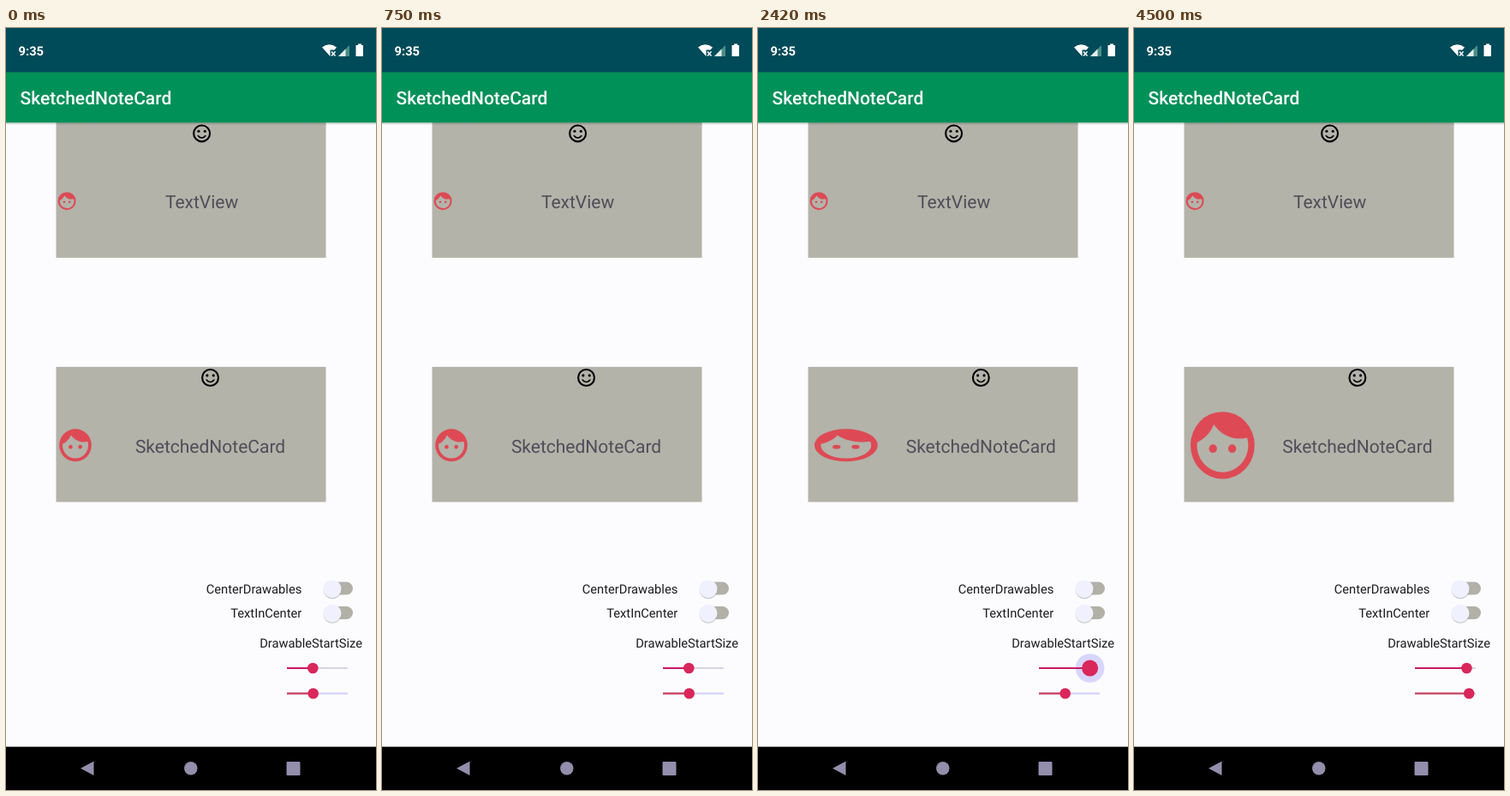
An HTML page for the animation above (4580 ms loop, 432x888 px).

```html
<!DOCTYPE html>
<html lang="en">
<head>
<meta charset="utf-8">
<title>Icon size sliders</title>
<style>
html, body { margin: 0; width: 100%; height: 100%; overflow: hidden; background: #fcfcff; }
svg { display: block; width: 432px; height: 888px; font-family: Roboto, sans-serif; text-rendering: geometricPrecision; }
.big { font-size: 21px; fill: #504d59; text-anchor: middle; }
.label { font-size: 14.7px; fill: #1b1b1d; text-anchor: end; }
.bar { font-weight: 500; fill: #fff; }
</style>
</head>
<body>
<svg viewBox="0 0 432 888">
  <defs>
    <linearGradient id="shade" x2="0" y2="1">
      <stop stop-color="#000" stop-opacity=".2"/>
      <stop offset="1" stop-color="#000" stop-opacity="0"/>
    </linearGradient>
    <path id="face" fill="#dd4a55" fill-rule="evenodd" d="M9 11.75a1.25 1.25 0 1 0 0 2.5a1.25 1.25 0 1 0 0-2.5z M15 11.75a1.25 1.25 0 1 0 0 2.5a1.25 1.25 0 1 0 0-2.5z M12 2a10 10 0 1 0 0 20a10 10 0 1 0 0-20z M12 20a8 8 0 0 1-7.95-8.86c2.36-1.05 4.23-2.98 5.21-5.37C11.07 8.33 14.05 10 17.42 10c.78 0 1.53-.09 2.25-.26A8 8 0 0 1 12 20z"/>
    <g id="smile" transform="scale(1.05) translate(-12 -12)">
      <circle cx="12" cy="12" r="9" fill="none" stroke="#000" stroke-width="2"/>
      <circle cx="8.5" cy="9.5" r="1.5"/>
      <circle cx="15.5" cy="9.5" r="1.5"/>
      <path d="M12 16c-1.48 0-2.75-.81-3.45-2H6.88c.8 2.05 2.79 3.5 5.12 3.5s4.32-1.45 5.12-3.5h-1.67c-.7 1.19-1.97 2-3.45 2z"/>
    </g>
    <g id="switch">
      <rect x="371" y="-7.5" width="34" height="15" rx="7.5" fill="#b1b1a8"/>
      <circle cx="381" cy="1.8" r="10.5" fill="#000" opacity=".2"/>
      <circle cx="381" cy=".7" r="10.5" fill="#f1f0fe"/>
    </g>
  </defs>

  <rect width="432" height="888" fill="#fcfcff"/>
  <g fill="#b3b3a9">
    <rect x="58.5" y="110" width="315" height="157.8"/>
    <rect x="58.5" y="394.9" width="315" height="157.5"/>
  </g>

  <rect y="110.3" width="432" height="3" fill="url(#shade)"/>
  <rect y="51" width="432" height="59.3" fill="#009158"/>
  <rect width="432" height="51.5" fill="#004b59"/>
  <text class="bar" x="14.6" y="32" font-size="14.7" style="font-weight:700">9:35</text>
  <text class="bar" x="16.5" y="89" font-size="21">SketchedNoteCard</text>

  <path d="M369 22.5Q377.5 16 386 22.5L383.5 25.5H378.5V33z" fill="#fff"/>
  <path d="M380 27.5l4.5 5m0-5l-4.5 5" stroke="#fff" stroke-width="1.5"/>
  <path d="M388 33L401 20V33z" fill="#4a8d87"/>
  <path d="M388 33L396.5 24.5V33z" fill="#e4f3ee"/>
  <path d="M411 18.5h4v1.5h2v13h-8.5v-13h2.5z" fill="#fff"/>

  <use href="#smile" transform="translate(228.6 122.9)"/>
  <use href="#face" transform="translate(58.5 189.1) scale(1.05)"/>
  <text class="big" x="228.6" y="210">TextView</text>

  <use id="sized" href="#face"/>
  <g id="shifted">
    <use href="#smile" transform="translate(0 407.5)"/>
    <text class="big" y="495">SketchedNoteCard</text>
  </g>

  <text class="label" x="345.3" y="658.5">CenterDrawables</text>
  <text class="label" x="345.3" y="687">TextInCenter</text>
  <text class="label" x="416" y="722">DrawableStartSize</text>
  <use href="#switch" y="653"/>
  <use href="#switch" y="681.5"/>
  <g id="sliders"></g>

  <rect y="837.6" width="432" height="51"/>
  <g fill="#938eab">
    <path d="M87 862.8L102.5 854.6V871z"/>
    <circle cx="215.8" cy="862.8" r="7.7"/>
    <rect x="327.5" y="855" width="16" height="16" rx="1"/>
  </g>
</svg>
<script>
const LOOP = 4580, TRACK = 328, SCALE = 1.487;
const $ = id => document.getElementById(id);

// Repaint runs: first time, last time, number of repaints
const RUNS = [[2170, 2420, 6], [2630, 2880, 5], [3130, 3250, 2],
              [3420, 3420, 1], [3590, 3670, 3], [3920, 4380, 8]];

// Keys are [time, value]
const sliders = [
  { y: 746, fill: '#c91a68', rest: '#d7d5e4',
    pos: [[2120, 358.3], [2420, 387.6], [2580, 387.6], [2680, 388.4]],
    press: [[2120, 0], [2320, 1], [2580, 1], [2880, 0]] },
  { y: 775.5, fill: '#c93852', rest: '#d0cffb',
    pos: [[3130, 358.7], [3250, 360.1], [3420, 382], [3590, 389], [3670, 391.2]],
    press: [[3050, 0], [3250, .5], [3420, 1], [3880, 1], [4250, 0]] }
];

for (const s of sliders) {
  $('sliders').insertAdjacentHTML('beforeend', `<g>
    <circle cy="${s.y}" fill="#d8d6fb"/>
    <path d="M${TRACK} ${s.y}H399" stroke="${s.rest}" stroke-width="2.1"/>
    <path stroke="${s.fill}" stroke-width="2.1"/>
    <circle cy="${s.y}" fill="#d9265b"/></g>`);
  [s.ripple, , s.bar, s.thumb] = $('sliders').lastElementChild.children;
}

// Time of the latest repaint
function snap(t) {
  let last = 0;
  for (const [from, to, n] of RUNS) {
    if (t < from) break;
    const step = n > 1 ? (to - from) / (n - 1) : 1;
    last = Math.min(to, from + Math.floor((t - from) / step + 1e-6) * step);
  }
  return last;
}

function at(keys, t) {
  const i = keys.findIndex(k => k[0] > t);
  if (i < 0) return keys[keys.length - 1][1];
  if (i === 0) return keys[0][1];
  const [t0, a] = keys[i - 1], [t1, b] = keys[i];
  return a + (b - a) * (t - t0) / (t1 - t0);
}

function draw(now) {
  const t = snap(now % LOOP);
  const [w, h] = sliders.map(s => {
    const x = at(s.pos, t), p = at(s.press, t), glow = Math.min(1, 2 * p);
    s.bar.setAttribute('d', `M${TRACK} ${s.y}H${x}`);
    s.thumb.setAttribute('cx', x);
    s.thumb.setAttribute('r', 6.3 + 3.2 * p);
    s.ripple.setAttribute('cx', x);
    s.ripple.setAttribute('r', 12 + 4.8 * glow);
    s.ripple.setAttribute('opacity', glow);
    return (x - TRACK) * SCALE;
  });
  $('sized').setAttribute('transform',
    `translate(58.5 ${486.3 - h / 2}) scale(${w / 24} ${h / 24})`);
  $('shifted').setAttribute('transform', `translate(${216 + w / 2} 0)`);
  requestAnimationFrame(draw);
}
requestAnimationFrame(draw);
</script>
</body>
</html>
```
